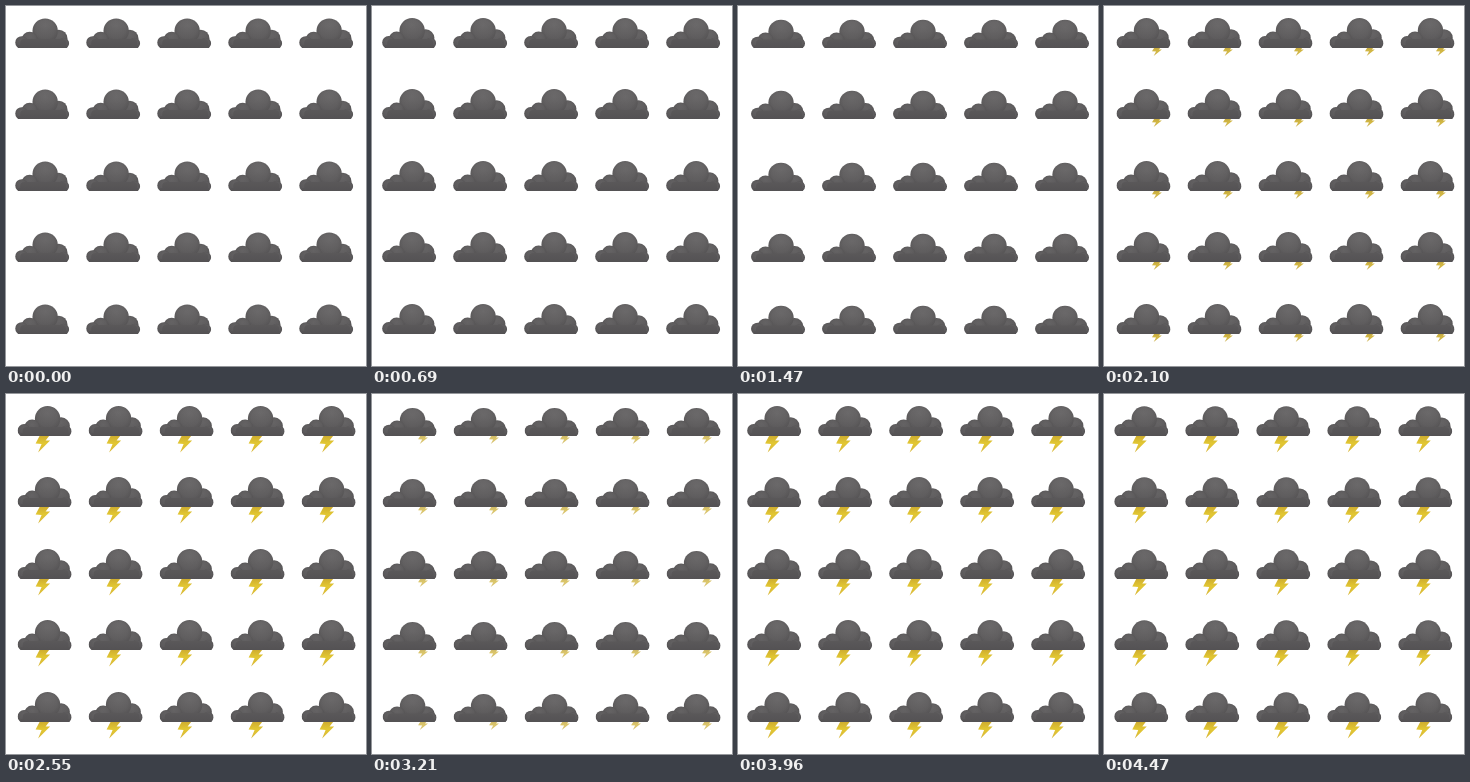
An HTML page with a canvas for the animation above (4500 ms loop, 360 by 360 pixels).

```html
<!DOCTYPE html>
<html lang="en">
<head>
<meta charset="utf-8">
<title>Storm clouds</title>
<style>
  html, body { margin: 0; width: 100%; height: 100%; overflow: hidden; background: #fff; }
  canvas { display: block; width: 360px; height: 360px; }
</style>
</head>
<body>
<canvas id="stage"></canvas>
<script>
const LOOP = 4500, SIZE = 360, GRID = 5, BASE = 42, FADE = 90, TURN = 2 * Math.PI;
const canvas = document.getElementById("stage");
const ctx = canvas.getContext("2d");
const ratio = window.devicePixelRatio || 1;
canvas.width = canvas.height = SIZE * ratio;

const FLASHES = [
  { start: 150, end: 420, large: true },
  { start: 930, end: 1230, large: true },
  { start: 1840, end: 2340, large: false },
  { start: 2340, end: 2900, large: true },
  { start: 3140, end: 3560, large: false },
  { start: 3780, end: LOOP + FADE, large: true }
];
const BOLT = [[5, 0], [15, 0], [10, 6.5], [14.5, 6.5], [2.5, 18.5], [6, 10], [0, 9.5]];

const wave = (t, period, peak) => 0.5 + 0.5 * Math.cos(TURN * (t - peak) / period);
const clamp = v => Math.max(0, Math.min(1, v));

function verticalShade(top, bottom, ...colors) {
  const shade = ctx.createLinearGradient(0, top, 0, bottom);
  colors.forEach((color, i) => shade.addColorStop(i / (colors.length - 1), color));
  return shade;
}

function drawBolt({ start, end, large }, t) {
  const alpha = clamp(Math.min((t - start) / FADE, (end - t) / FADE));
  if (!alpha) return;
  ctx.save();
  ctx.globalAlpha = alpha;
  ctx.translate(large ? 27 : 44.5, 40);
  if (!large) ctx.scale(0.68, 0.54);
  ctx.fillStyle = large
    ? verticalShade(0, 18.5, "#c9a62f", "#e2c732", "#d8b63a")
    : verticalShade(0, 18.5, "#b89c3c", "#d3b843", "#cbb052");
  ctx.beginPath();
  BOLT.forEach(([x, y]) => ctx.lineTo(x, y));
  ctx.fill();
  ctx.restore();
}

function drawLobe(x, y, r) {
  const glow = ctx.createRadialGradient(x, y - r * 0.4, 0, x, y, r);
  glow.addColorStop(0, "#ffffff10");
  glow.addColorStop(0.7, "#ffffff08");
  glow.addColorStop(1, "#00000008");
  for (const fill of [verticalShade(12, BASE, "#656364", "#5c5a5b", "#545254"), glow]) {
    ctx.fillStyle = fill;
    ctx.beginPath();
    ctx.arc(x, y, r, 0, TURN);
    ctx.fill();
  }
}

function drawCloud(sink) {
  ctx.save();
  ctx.translate(0, BASE);
  ctx.scale(1, 1 - sink / 30);
  ctx.translate(0, -BASE);
  ctx.beginPath();
  ctx.roundRect(9, 0, 54, BASE, 3);
  ctx.clip();
  drawLobe(52.5, 32 + sink, 8.8);
  drawLobe(39, 24.7, 12.7);
  drawLobe(23.5, 33.5, 8);
  drawLobe(15.5, 36.5, 6.5);
  drawLobe(57.3, 37.3, 5.7);
  ctx.fillStyle = verticalShade(30, BASE, "#5c5a5b", "#545254");
  ctx.beginPath();
  ctx.roundRect(14, 33, 46, BASE - 33, 4);
  ctx.fill();
  ctx.fillRect(12, 39, 49, BASE - 39);
  ctx.restore();
}

function draw(now) {
  const t = now % LOOP;
  const sink = 2 * wave(t, 1850, 1350) ** 2;
  const drift = 3.6 * wave(t, 3750, 1875) + sink * 0.45;
  ctx.setTransform(ratio, 0, 0, ratio, 0, 0);
  ctx.fillStyle = "#fff";
  ctx.fillRect(0, 0, SIZE, SIZE);
  for (let row = 0; row < GRID; row++) {
    for (let col = 0; col < GRID; col++) {
      ctx.save();
      ctx.translate(col * 71 + drift, Math.floor(row * 71.5));
      FLASHES.forEach(flash => drawBolt(flash, t));
      drawCloud(sink);
      ctx.restore();
    }
  }
}

const started = performance.now();
function tick() {
  draw(performance.now() - started);
  requestAnimationFrame(tick);
}
tick();
</script>
</body>
</html>
```
